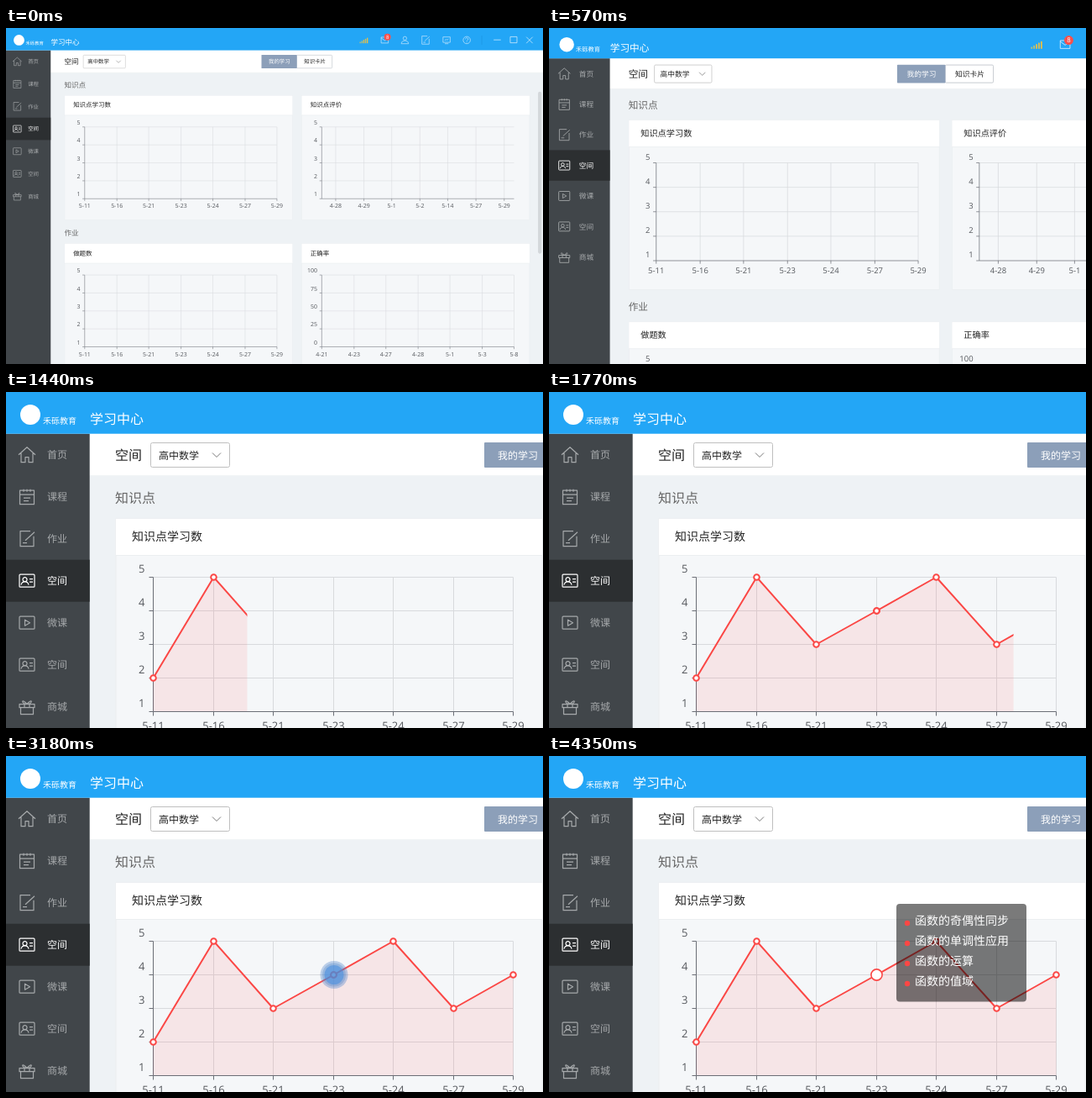
An HTML page that plays this animation: 640x400 px, repeating every 4530 ms.

```html
<!DOCTYPE html>
<html lang="zh-CN">
<head>
<meta charset="utf-8">
<title>学习中心</title>
<style>
  html, body { margin: 0; width: 100%; height: 100%; overflow: hidden; background: #eef2f5; }
  svg { display: block; width: 640px; height: 400px; }
  text {
    font-family: "Noto Sans CJK SC", "Noto Sans CJK", sans-serif;
    font-weight: 500;
    text-rendering: geometricPrecision;
  }
  .thin { font-weight: 400; }
  .num { font: 500 13px "Open Sans", "Noto Sans", sans-serif; fill: #55585d; }
  .mid { text-anchor: middle; }
  .end { text-anchor: end; }
  .icon { fill: none; stroke-width: 1.2; stroke-linejoin: round; }
</style>
</head>
<body>
<svg viewBox="0 0 640 400">
  <defs><clipPath id="wipe"><rect id="edge" x="171" y="200" width="0" height="200"/></clipPath></defs>
  <g id="stage">
    <g id="page"></g>
    <g clip-path="url(#wipe)" id="plot"></g>
    <circle id="point" cx="390.5" cy="260.5" r="3.3" fill="#fff" stroke="#fb4745" stroke-width="2" clip-path="url(#wipe)"/>
    <g id="pointer">
      <circle r="16.5" fill="#4a80c8" opacity=".35"/>
      <circle r="14" fill="#4a80c8" opacity=".3"/>
      <circle r="11.5" fill="#4a90e0" opacity=".6"/>
      <circle id="core" r="11.5" fill="#4a6be6"/>
    </g>
    <g id="tip"></g>
  </g>
</svg>
<script>
const $ = id => document.getElementById(id);

// Markup helpers
const rect = (x, y, w, h, fill, more = '') =>
  `<rect x="${x}" y="${y}" width="${w}" height="${h}" fill="${fill}" ${more}/>`;
const text = (x, y, size, fill, str, cls = '') =>
  `<text x="${x}" y="${y}" font-size="${size}" fill="${fill}" class="${cls}">${str}</text>`;
const num = (x, y, str, cls) => `<text x="${x}" y="${y}" class="num ${cls}">${str}</text>`;
const path = (d, stroke, more = '') => `<path d="${d}" fill="none" stroke="${stroke}" ${more}/>`;
const icon = (x, y, d, stroke) =>
  `<path class="icon" transform="translate(${x} ${y})" d="${d}" stroke="${stroke}"/>`;

// Icons are drawn around their own centre
const box = 'M-8-7.500H8Q9-7.500 9-6.500V6.500Q9 7.500 8 7.500H-8Q-9 7.500-9 6.500V-6.500Q-9-7.500-8-7.500Z';
const badge = box + 'M-7 5C-6 0 1 0 2 5M-5-1.500a2.500 2.500 0 1 0 5 0a2.500 2.500 0 1 0-5 0M3-2H7M3 1.500H7';
const pad = 'M4-9H-8V9H8V-3M-5 5H0M-2 2L9-8';
const icons = {
  home: 'M-10 0L0-9L10 0M-7-2V9H-2V3H2V9H7V-2',
  lesson: 'M-8.500-7.500H8.500V9H-8.500ZM-8.500-2.500H8.500M-4-9V-6M0-9V-6M4-9V-6M-4 1.500H4M-4 5H2',
  pad,
  badge,
  play: box + 'M-2.500-3.500L3.500 0L-2.500 3.500Z',
  shop: 'M-9-3H9V1H-9ZM-7.500 1V9H7.500V1M-3-3V1M3-3V1M0-3C-8-4-6-11 0-3C6-11 8-4 0-3',
  mail: 'M-8-6.500H8V6.500H-8ZM-8-5L0 1L8-5',
  user: 'M-4-4a4 4 0 1 0 8 0a4 4 0 1 0-8 0M-8 8C-8-1 8-1 8 8Z',
  screen: 'M-8-7H8V5H-8ZM-4 8H4M-4 1L-1-2L1 0L4-3',
  help: 'M-8 0a8 8 0 1 0 16 0a8 8 0 1 0-16 0M-3-2C-3-6 3-6 3-2C3 0 0 0 0 2M0 4V5.500',
};

function header() {
  let s = rect(0, 0, 1200, 49.7, '#23a6f6');
  s += '<circle cx="29" cy="27" r="12" fill="#fff"/>';
  s += text(44, 38, 10, '#fff', '禾砾教育') + text(100, 38, 16, '#fff', '学习中心');
  for (let i = 0; i < 5; i++)
    s += rect(789 + i * 4, 31 - i * 2.3, 2.5, 3 + i * 2.3, i < 2 ? '#b9bf78' : '#e3bf4c');
  [['mail', 845], ['user', 890], ['pad', 936], ['screen', 983], ['help', 1028]]
    .forEach(([name, x]) => s += icon(x, 27, icons[name], '#d6edfd'));
  s += '<circle cx="851" cy="20" r="7.500" fill="#f9504c"/>' + text(851, 24, 11, '#fff', '8', 'mid');
  s += path('M1061.500 17V37', '#1b8fdb');
  return s + path('M1088 26.500H1104M1125 19.500H1140V33H1125ZM1161 20L1175 34M1175 20L1161 34', '#d6edfd', 'stroke-width="1.4"');
}

function sidebar() {
  let s = rect(0, 49.7, 99.7, 720, '#41464a') + rect(0, 199.7, 99.7, 50, '#2c2f31');
  [['home', '首页'], ['lesson', '课程'], ['pad', '作业'], ['badge', '空间'],
   ['play', '微课'], ['badge', '空间'], ['shop', '商城']].forEach(([name, label], i) => {
    const color = i === 3 ? '#fff' : '#a6a9ab', y = 74.7 + i * 50;
    s += icon(25, y, icons[name], color) + text(49, y + 4.5, 12, color, label);
  });
  return s;
}

function toolbar() {
  return rect(99, 49, 1101, 50, '#fff') + path('M99 99.500H1200', '#f1f4f6')
    + text(130, 81, 16, '#222', '空间', 'thin')
    + rect(172.5, 60.5, 94, 29, '#fff', 'stroke="#bfbfbf" rx="2"')
    + text(182, 79.5, 12, '#222', '高中数学')
    + path('M246 72.500L251 77.500L256 72.500', '#777')
    + rect(648.5, 60.5, 79, 29, '#fff', 'stroke="#b4b9c0" rx="2"')
    + rect(570, 60, 79, 30, '#8c9fb9', 'rx="1"')
    + text(610, 79.5, 12, '#fff', '我的学习', 'mid')
    + text(689, 79.5, 12, '#222', '知识卡片', 'mid');
}

// Chart columns sit on whole pixels
const column = (i, step) => Math.round(i * step);

// One chart card; first and step place the vertical grid lines
function card(x, y, title, yLabels, xLabels, first = 0, step = 71.5) {
  const left = x + 44.5, top = y + 69.5, bottom = top + 160, right = left + 429;
  let s = rect(x, y, 508, 277, '#f5f7f9', 'stroke="#ebeef0"') + rect(x, y, 508, 43, '#fff')
    + path(`M${x} ${y + 43.5}H${x + 508}`, '#ebeef0')
    + text(x + 19, y + 25.7, 14, '#222', title);
  let grid = '', axis = `M${left} ${top}V${bottom}H${right}`;
  yLabels.forEach((label, i) => {
    const ly = top + i * 40;
    if (i < 4) grid += `M${left} ${ly}H${right}`;
    axis += `M${left - 5} ${ly}H${left}`;
    s += num(left - 10, ly - 5.5, label, 'end');
  });
  xLabels.forEach((label, i) => {
    const lx = left + first + column(i, step);
    if (lx > left) grid += `M${lx} ${top}V${bottom}`;
    axis += `M${lx} ${bottom}v5`;
    s += num(lx, bottom + 21, label, 'mid');
  });
  return s + path(grid, '#d8dadd') + path(axis, '#6b6e76');
}

const marks = [5, 4, 3, 2, 1];
const days = '5-11 5-16 5-21 5-23 5-24 5-27 5-29'.split(' ');

$('page').innerHTML = rect(0, 0, 1200, 760, '#eef2f5')
  + text(130, 132, 16, '#666', '知识点', 'thin') + text(130, 462, 16, '#666', '作业', 'thin')
  + card(131, 151, '知识点学习数', marks, days)
  + card(660, 151, '知识点评价', marks, '4-28 4-29 5-1 5-2 5-14 5-27 5-29'.split(' '), 31, 62.6)
  + card(131, 481, '做题数', marks, days)
  + card(660, 481, '正确率', [100, 75, 50, 25, 0], '4-21 4-23 4-27 4-28 5-1 5-3 5-8'.split(' '))
  + rect(1187, 142, 8, 361, '#d3d7da', 'rx="4"')
  + toolbar() + sidebar() + header();

const points = [2, 5, 3, 4, 5, 3, 4].map((v, i) => [175.5 + column(i, 71.5), 420.5 - v * 40]);
const line = 'M' + points.join('L');
$('plot').innerHTML = `<path d="${line}V380H175.500Z" fill="#ff4646" opacity=".1"/>`
  + path(line, '#fb4745', 'stroke-width="2" stroke-linejoin="round"')
  + points.map(([x, y]) => `<circle cx="${x}" cy="${y}" r="3.300" fill="#fff" stroke="#fb4745" stroke-width="2"/>`).join('');

$('tip').innerHTML = rect(414, 176, 155, 116.5, '#000', 'opacity=".52" rx="4"')
  + ['函数的奇偶性同步', '函数的单调性应用', '函数的运算', '函数的值域'].map((label, i) =>
    `<circle cx="427" cy="${199 + i * 24}" r="3.200" fill="#fb4745"/>` + text(436, 201 + i * 24, 14, '#fff', label)).join('');

const LOOP = 4530, TICK = 30, ZOOM = 1.872;
const span = (t, from, length) => Math.min(1, Math.max(0, (t - from) / length));
const set = (id, name, value) => $(id).setAttribute(name, value);

function draw(now) {
  const t = Math.floor(now % LOOP / TICK) * TICK;

  // The visible width shrinks evenly while the camera moves in
  const width = ZOOM + (1 - ZOOM) * span(t, 150, 735);
  set('stage', 'transform', `scale(${1 / width})`);

  set('edge', 'width', 438 * span(t, 1050, 772) ** 1.94);

  const move = span(t, 2130, 523);
  set('pointer', 'transform', `translate(${410 - 19 * move} ${144.5 + 116 * move})`);
  set('pointer', 'opacity', t < 3240 ? span(t, 1920, 210) : 0);
  set('core', 'opacity', 1 - span(t, 2670, 510));

  const grow = span(t, 3360, 390);
  set('point', 'r', 3.3 + 3.3 * grow);
  set('point', 'stroke-width', 2 - 0.4 * grow);

  set('tip', 'opacity', span(t, 3930, 420));
}

let start;
function loop(now) {
  start ??= now;
  draw(now - start);
  requestAnimationFrame(loop);
}
draw(0);
requestAnimationFrame(loop);
</script>
</body>
</html>
```
